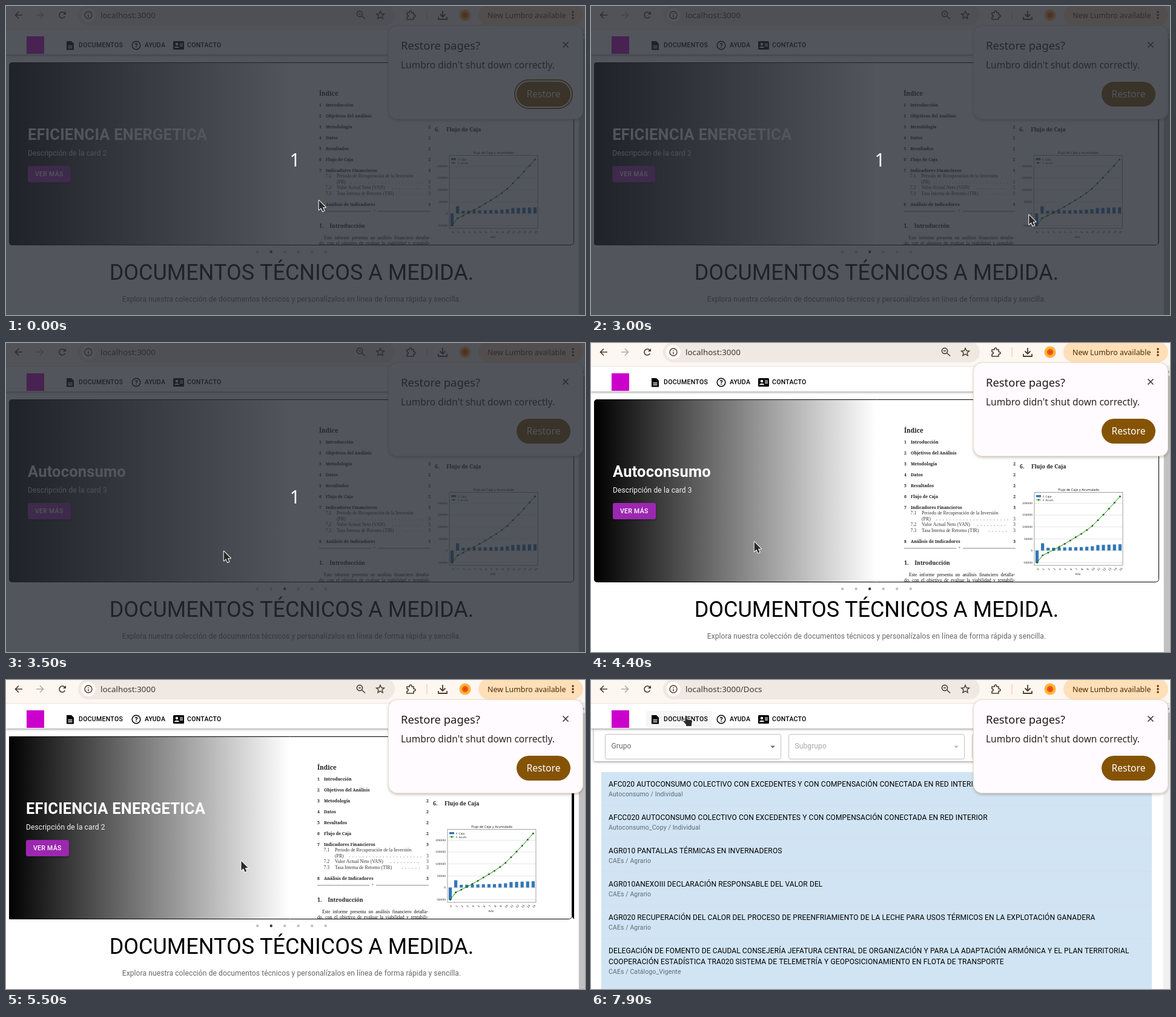
Write an HTML page with a canvas that moves like this. It is 956 by 510 pixels and loops after 8000 ms.

```html
<!DOCTYPE html>
<html lang="es">
<head>
<meta charset="utf-8">
<title>Documentos técnicos</title>
<style>
html, body { margin: 0; width: 100%; height: 100%; overflow: hidden; background: #fff; }
canvas { display: block; width: 956px; height: 510px; }
</style>
</head>
<body>
<canvas id="stage" width="956" height="510"></canvas>
<script>
const c = document.getElementById('stage').getContext('2d');
const LOOP = 8000, PITCH = 933;
const UI = '"Noto Sans", "Open Sans", sans-serif';
const WEB = 'Roboto, sans-serif';
const SERIF = '"Liberation Serif", serif';
const HEAVY = '"Noto Serif", serif';
const ARIAL = '"Liberation Sans", sans-serif';
const PLOT = '"DejaVu Sans", sans-serif';
const INK = '#4b3b2a', PURPLE = '#9c27b0';

// times of the hard changes
const T = { ring: 100, next: 3000, fade: 3850, grab: 4750, drop: 5049, busy: 6500, reload: 6600, hover: 7300, docs: 7500 };

// cursor path: time, x, y
const PATH = [
  [0, 516, 320], [100, 500, 324], [200, 455, 334], [300, 424, 338], [400, 490, 339], [500, 600, 338],
  [600, 700, 337], [700, 740, 336], [850, 740, 336], [1000, 731, 339], [1100, 724, 342], [1600, 724, 342],
  [1700, 723, 344], [3000, 723, 344], [3200, 610, 350], [3500, 359, 343], [3700, 325, 338], [3820, 325, 338],
  [4700, 240, 322], [4750, 240, 322], [5049, 594, 323], [5100, 600, 323], [5250, 540, 316], [5500, 388, 298],
  [5600, 352, 281], [6000, 200, 150], [6400, 66, 65], [6500, 63, 62], [6700, 63, 62], [6900, 130, 67],
  [7000, 172, 66], [7100, 166, 62], [7300, 159, 60], [7500, 157, 59], [8000, 157, 59]
];

function text(s, x, y, size, family, color = '#000', o = {}) {
  c.font = `${o.w || 400} ${size}px ${family}`;
  c.letterSpacing = (o.ls || 0) * size + 'px';
  c.textAlign = o.align || 'left';
  c.fillStyle = color;
  c.fillText(s, x, y);
}

function justify(s, x, y, width, size, family) {
  c.font = `400 ${size}px ${family}`;
  c.letterSpacing = '0px';
  c.wordSpacing = (width - c.measureText(s).width) / (s.split(' ').length - 1) + 'px';
  text(s, x, y, size, family, '#111');
  c.wordSpacing = '0px';
}

function rect(x, y, w, h, color) {
  c.fillStyle = color;
  c.fillRect(x, y, w, h);
}

function round(x, y, w, h, r, fill, stroke, lw = 1) {
  c.beginPath();
  c.roundRect(x, y, w, h, r);
  if (fill) { c.fillStyle = fill; c.fill(); }
  if (stroke) { c.strokeStyle = stroke; c.lineWidth = lw; c.stroke(); }
}

function disc(x, y, r, fill) {
  c.beginPath();
  c.arc(x, y, r, 0, 7);
  c.fillStyle = fill;
  c.fill();
}

function ring(x, y, r, color, lw, a = 0, b = 7) {
  c.beginPath();
  c.arc(x, y, r, a, b);
  c.strokeStyle = color;
  c.lineWidth = lw;
  c.stroke();
}

function shape(d, x, y, stroke, lw, fill) {
  const p = new Path2D(d);
  c.save();
  c.translate(x, y);
  if (stroke) { c.strokeStyle = stroke; c.lineWidth = lw; c.stroke(p); }
  if (fill) { c.fillStyle = fill; c.fill(p); }
  c.restore();
}

function shadow(color, blur, dy) {
  c.shadowColor = color;
  c.shadowBlur = blur;
  c.shadowOffsetY = dy;
}
const noShadow = () => shadow('transparent', 0, 0);

// the CSS "ease" curve
function ease(x) {
  if (x <= 0) return 0;
  if (x >= 1) return 1;
  let lo = 0, hi = 1, s = .5;
  for (let i = 0; i < 20; i++) {
    s = (lo + hi) / 2;
    const u = 1 - s;
    if (.75 * u * u * s + .75 * u * s * s + s * s * s < x) lo = s; else hi = s;
  }
  const u = 1 - s;
  return .3 * u * u * s + 3 * u * s * s + s * s * s;
}

function cursorAt(t) {
  const i = Math.max(1, PATH.findIndex(p => p[0] > t));
  const [t0, x0, y0] = PATH[i - 1], [t1, x1, y1] = PATH[i];
  const k = (t - t0) / (t1 - t0);
  return [x0 + (x1 - x0) * k, y0 + (y1 - y0) * k];
}

function slideAt(t) {
  if (t >= T.reload) return 0;
  if (t < T.grab) return 1 + ease((t - T.next) / 500);
  const held = 2 - (cursorAt(Math.min(t, T.drop))[0] - 240) / PITCH;
  return held + (1 - held) * ease((t - T.drop) / 500);
}

const dotAt = t => t < T.next ? 1 : t < T.drop ? 2 : t < T.reload ? 1 : 0;

function toolbar(t) {
  rect(0, 0, 956, 39, '#fdf7f2');
  round(119, -2, 523, 34, 17, '#f0e8e2');
  shape('M6 0H-5M0-5.5L-5.5 0L0 5.5', 21, 15, INK, 1.7);
  shape('M-6 0H5M0-5.5L5.5 0L0 5.5', 56, 15, '#b3aaa2', 1.7);
  if (t >= T.busy && t < T.reload) shape('M-5-5L5 5M5-5L-5 5', 93, 15, INK, 1.7);
  else {
    ring(93, 15, 5, INK, 1.7, .5, 5.6);
    shape('M6-6V-1H1Z', 93, 15, null, 0, INK);
  }
  disc(136, 15, 12, '#fffaf6');
  ring(136, 15, 6, INK, 1.4);
  shape('M0-3V-1.5M0 0V3.5', 136, 15, INK, 1.5);
  text(t >= T.docs ? 'localhost:3000/Docs' : 'localhost:3000', 156, 20, 13.4, UI, '#41372d');
  ring(584, 13, 4.6, INK, 1.6);
  shape('M3.5 3.5L9 8.5M-2 0H2', 584, 13, INK, 1.6);
  shape('M0-6.5L1.9-2.2L6.5-1.8L3 1.2L4.1 5.8L0 3.4L-4.1 5.8L-3 1.2L-6.5-1.8L-1.9-2.2Z', 618, 15, INK, 1.4);
  shape('M-6-4H-2C-2-8 2-8 2-4H5V-.5C9-.5 9 3.5 5 3.5V7H-6V3.5C-3 3.5-3-.5-6-.5Z', 668, 15, INK, 1.6);
  rect(694, 7, 2, 16, '#fbd9b3');
  shape('M0-7V3M-4.5-1.5L0 3L4.5-1.5M-7 3V7H7V3', 721, 15, INK, 1.8);
  const g = c.createRadialGradient(758, 15, 1, 758, 15, 9.5);
  g.addColorStop(0, '#e8401c');
  g.addColorStop(.45, '#f4671c');
  g.addColorStop(.6, '#ffc31f');
  g.addColorStop(1, '#ffa64a');
  disc(758, 15, 9.5, g);
  round(780, -2, 173, 34, 17, '#ffdfb8');
  text('New Lumbro available', 795, 20, 12.4, UI, '#4a2d05');
  for (const y of [10, 15, 20]) disc(936, y, 1.7, '#4a2d05');
  rect(0, 38, 956, 1, '#ece3dc');
}

function header(t) {
  shadow('rgba(0,0,0,.45)', 4, 1);
  rect(0, 39, 945, 41, '#fff');
  noShadow();
  rect(0, 39, 945, 3, '#fff');
  if (t >= T.hover) round(91, 51, 109, 27, 3, '#f6f6f6');
  rect(34, 50, 29, 29, '#cc00cc');
  shape('M-6-7H2L6-3V7.5H-6Z', 106, 65, null, 0, '#000');
  shape('M-3.5 1H3.5M-3.5 4H3.5', 106, 65, '#fff', 1.3);
  ring(215, 65, 6.8, '#000', 1.5);
  text('?', 215, 69, 10.5, WEB, '#000', { w: 700, align: 'center' });
  round(276, 58, 18, 14, 1.5, '#000');
  disc(282, 63, 2.2, '#fff');
  shape('M-4 4C-4 1 4 1 4 4ZM5-3H10V-1.6H5ZM5 0H10V1.4H5Z', 282, 65, null, 0, '#fff');
  const nav = { w: 500, ls: .02857 };
  text('DOCUMENTOS', 120, 68, 10.5, WEB, '#000', nav);
  text('AYUDA', 229, 68, 10.5, WEB, '#000', nav);
  text('CONTACTO', 299, 68, 10.5, WEB, '#000', nav);
}

function scrollbar(top, height) {
  rect(945, 39, 11, 471, '#f0f0f0');
  shape('M-2 1.5L0-1.5L2 1.5Z', 953, 47, null, 0, '#777');
  rect(946, top, 10, height, '#c1c1c1');
}

function chart() {
  const zero = 342.5, step = 9.13, x0 = 736.5;
  const flow = [-20, 12, 4.5, 4.6, 4.9, 5.1, 5.3, 5.5, 5.7, 6.2, 7, 9.1, 9.4, 9.7, 10, 10.3];
  text('Flujo de Caja y Acumulado', 805, 244, 5.1, PLOT, '#111', { align: 'center' });
  for (let k = -1; k < 5; k++) {
    const y = zero - k * 19.6;
    rect(732, y, 146, .6, '#d4d4d4');
    text(String(k * 50000), 729, y + 1.7, 4.4, PLOT, '#222', { align: 'right' });
  }
  c.strokeStyle = '#777';
  c.lineWidth = .7;
  c.strokeRect(732, 246.5, 146, 120.5);
  flow.forEach((v, i) => rect(x0 + i * step - 2.6, zero - Math.max(v, 0), 5.2, Math.abs(v), '#3377b8'));
  let sum = 0;
  const pts = flow.map((v, i) => [x0 + i * step, zero - (sum += v)]);
  c.beginPath();
  pts.forEach(p => c.lineTo(...p));
  c.strokeStyle = '#2c8a1c';
  c.lineWidth = 1;
  c.stroke();
  pts.forEach(([x, y], i) => {
    disc(x, y, 1.5, '#187010');
    c.save();
    c.translate(x + 1, 373);
    c.rotate(-.8);
    text(String(i), 0, 2, 4.4, PLOT, '#222', { align: 'center' });
    c.restore();
  });
  rect(735, 251, 8, 3.5, '#3377b8');
  text('F. Caja', 746, 254.5, 4.4, PLOT, '#222');
  rect(735, 258.5, 8, .8, '#2c8a1c');
  disc(739, 259, 1.4, '#187010');
  text('F. Acum.', 746, 260.5, 4.4, PLOT, '#222');
  text('Año', 804, 383, 4.6, PLOT, '#222', { align: 'center' });
}

function report() {
  const bold = { w: 700 }, dark = '#1c1c1c';
  const head = (n, s, x, y, dx) => {
    text(n, x, y, 8.8, HEAVY, dark, bold);
    text(s, x + dx, y, 8.8, HEAVY, dark, bold);
  };
  text('Índice', 517, 148, 10, HEAVY, dark, { w: 600 });
  const items = ['Introducción', 'Objetivos del Análisis', 'Metodología', 'Datos', 'Resultados', 'Flujo de Caja',
    'Indicadores Financieros', 'Análisis de Indicadores'];
  items.forEach((s, i) => {
    const y = i < 7 ? 166 + i * 17.95 : 329.5;
    text(String(i + 1), 517, y, 6.9, HEAVY, dark, bold);
    text(s, 528, y, 6.9, HEAVY, dark, bold);
    text(i < 6 ? '2' : '3', 701, y, 6.9, HEAVY, dark, { w: 700, align: 'right' });
  });
  const subs = [['7.1', 'Periodo de Recuperación de la Inversión', 283], ['', '(PR)', 292.5, 570],
    ['7.2', 'Valor Actual Neto (VAN)', 302, 638], ['7.3', 'Tasa Interna de Retorno (TIR)', 311.5, 657]];
  for (const [n, s, y, lead] of subs) {
    text(n, 527.5, y, 7.8, SERIF, '#333');
    text(s, 546, y, 7.8, SERIF, '#333');
    if (!lead) continue;
    for (let x = lead; x < 688; x += 5.6) rect(x, y - 1, 1, 1, '#666');
    text('3', 701, y, 7.8, SERIF, '#333', { align: 'right' });
  }
  rect(517, 338.5, 86, .8, '#666');
  rect(614, 338.5, 87, .8, '#666');
  text('+', 608.5, 340, 7, SERIF, '#333', { align: 'center' });
  head('1.', 'Introducción', 517, 366, 17.5);
  justify('Este informe presenta un análisis financiero detalla-', 525, 385, 175, 7.8, SERIF);
  justify('do, con el objetivo de evaluar la viabilidad y rentabili-', 517, 394, 183, 7.8, SERIF);

  head('5.', 'Resultados', 708, 146, 19);
  c.strokeStyle = '#444';
  c.lineWidth = 1;
  c.strokeRect(717, 158.5, 167, 27);
  [['Periodo de recuperación [años]', '3'], ['Valor Actual Neto [€]', '125279.4'], ['Tasa Interna de Retorno [%]', '35.77']]
    .forEach(([a, b], i) => {
      text(a, 722, 165 + i * 9.2, 7.8, SERIF, dark);
      text(b, 851, 165 + i * 9.2, 7.8, SERIF, dark);
    });
  head('6.', 'Flujo de Caja', 708, 206.5, 19);
  chart();
}

function sheet() {
  rect(538, 149, 338, 57, '#e4e4e4');
  c.strokeStyle = '#555';
  c.lineWidth = 1;
  for (const [y, h] of [[149.5, 57], [206.5, 18], [224.5, 18], [242.5, 18]]) {
    c.strokeRect(538.5, y, 73, h);
    c.strokeRect(611.5, y, 264, h);
  }
  text('Ficha', 543, 179, 9.3, ARIAL, '#111');
  ['RES090: Hibridación de caldera de', 'combustión con bomba de calor', 'eléctrica en vivienda de zona', 'climática A3 o A4']
    .forEach((s, i) => text(s, 616, 161 + i * 13, 9.3, ARIAL, '#111', { w: 700 }));
  [['Código', 'RES090'], ['Versión', 'V1.0'], ['Sector', 'Residencial']].forEach(([a, b], i) => {
    text(a, 543, 218.5 + i * 18, 7.6, ARIAL, '#111');
    text(b, 616, 219 + i * 18, 9.3, ARIAL, '#111');
  });
  text('1.', 652, 285, 9.3, ARIAL, '#111');
  text('ÁMBITO DE APLICACIÓN', 666, 285, 9.3, ARIAL, '#111');
  const line = (s, y) => justify(s, 538, y, 338, 9.3, ARIAL);
  line('Hibridación en modo paralelo de caldera/s de combustión existente/s en un edificio', 311);
  line('de uso residencial privado¹, ubicado en zona climática A3 o A4, con bomba de', 327);
  line('calor de accionamiento eléctrico tipo aire-aire, aire-agua o agua-agua o', 343);
  text('combinadas, para la calefacción y/o, agua caliente sanitaria (ACS).', 538, 359, 9.3, ARIAL, '#111');
  line('En esta ficha no es aplicable las bombas de calor cuyo compresor esté accionado', 378);
  text('térmicamente.', 538, 394, 9.3, ARIAL, '#111');
}

const CARDS = [
  { title: ['Certificados de Ahorro Energético', '(CAE)'], page: sheet,
    body: ['CÁLCULO DEL AHORRO DE ENERGÍA mediante fichas de medidas', 'estandarizadas.'] },
  { title: ['EFICIENCIA ENERGETICA'], body: ['Descripción de la card 2'], page: report },
  { title: ['Autoconsumo'], body: ['Descripción de la card 3'], page: report }
];

function card({ title, body, page }, dx) {
  c.save();
  c.translate(dx, 0);
  c.beginPath();
  c.roundRect(5, 93, PITCH, 302, 5);
  c.clip();
  rect(5, 93, PITCH, 302, '#fff');
  page();
  const g = c.createLinearGradient(5, 0, 471, 0);
  g.addColorStop(0, '#000');
  g.addColorStop(1, 'rgba(0,0,0,0)');
  rect(5, 93, 466, 302, g);
  let y = title.length > 1 ? 196 : 221;
  for (const s of title) {
    text(s, 36, y, 25.5, WEB, '#fff', { w: 700, ls: .00735 });
    y += 31;
  }
  y -= 5;
  for (const s of body) {
    text(s, 36, y, 12, WEB, '#f2f2f2', { ls: .00938 });
    y += 18;
  }
  const top = y - 1;
  shadow('rgba(0,0,0,.35)', 3, 1.5);
  round(36, top, 71, 27, 3, PURPLE);
  noShadow();
  text('VER MÁS', 48, top + 17, 10.5, WEB, '#fff', { w: 500, ls: .02857 });
  round(5.5, 93.5, PITCH - 1, 301, 5, null, '#000');
  c.restore();
}

function home(t) {
  rect(0, 39, 956, 471, '#fff');
  c.save();
  c.beginPath();
  c.rect(5, 93, PITCH, 302);
  c.clip();
  const pos = slideAt(t);
  CARDS.forEach((k, i) => {
    if (Math.abs(i - pos) < 1) card(k, (i - pos) * PITCH);
  });
  c.restore();
  const active = dotAt(t);
  for (let i = 0; i < 6; i++) disc(415.2 + i * 22.5, 405.8, 2.2, i === active ? '#3c3c3c' : '#bfbfbf');
  text('DOCUMENTOS TÉCNICOS A MEDIDA.', 471.5, 452, 36, WEB, '#000', { align: 'center' });
  text('Explora nuestra colección de documentos técnicos y personalízalos en línea de forma rápida y sencilla.',
    471.5, 488, 12, WEB, '#666', { align: 'center', ls: .00938 });
  header(t);
  scrollbar(54, 456);
}

const ROWS = [
  ['Autoconsumo / Individual', 'AFC020 AUTOCONSUMO COLECTIVO CON EXCEDENTES Y CON COMPENSACIÓN CONECTADA EN RED INTERIOR'],
  ['Autoconsumo_Copy / Individual', 'AFCC020 AUTOCONSUMO COLECTIVO CON EXCEDENTES Y CON COMPENSACIÓN CONECTADA EN RED INTERIOR'],
  ['CAEs / Agrario', 'AGR010 PANTALLAS TÉRMICAS EN INVERNADEROS'],
  ['CAEs / Agrario', 'AGR010ANEXOIII DECLARACIÓN RESPONSABLE DEL VALOR DEL'],
  ['CAEs / Agrario', 'AGR020 RECUPERACIÓN DEL CALOR DEL PROCESO DE PREENFRIAMIENTO DE LA LECHE PARA USOS TÉRMICOS EN LA EXPLOTACIÓN GANADERA'],
  ['CAEs / Catálogo_Vigente',
    'DELEGACIÓN DE FOMENTO DE CAUDAL CONSEJERÍA JEFATURA CENTRAL DE ORGANIZACIÓN Y PARA LA ADAPTACIÓN ARMÓNICA Y EL PLAN TERRITORIAL',
    'COOPERACIÓN ESTADÍSTICA TRA020 SISTEMA DE TELEMETRÍA Y GEOPOSICIONAMIENTO EN FLOTA DE TRANSPORTE']
];

function docs(t) {
  rect(0, 39, 956, 471, '#fff');
  shadow('rgba(0,0,0,.45)', 4, 1);
  rect(5, 80, 939, 54, '#fff');
  noShadow();
  [['Grupo', '#666'], ['Subgrupo', '#a8a8a8'], ['', '#a8a8a8']].forEach(([s, color], i) => {
    const x = 23.5 + i * 303;
    round(x, 89.5, 290, 41, 3, '#fff', '#c0c0c0');
    text(s, x + 10, 113, 12, WEB, color, { ls: .00938 });
    shape('M-4-2H4L0 2Z', x + 276.5, 110.5, null, 0, i ? '#bdbdbd' : '#757575');
  });
  rect(17, 152, 909, 358, '#d0e4f4');
  ROWS.forEach(([sub, ...lines], i) => {
    let y = 176 + i * 55;
    if (i) rect(17, 151 + i * 55, 909, 1, '#d4dfe6');
    for (const s of lines) {
      text(s, 29, y, 12, WEB, '#000', { ls: .00938 });
      y += 18;
    }
    text(sub, 29, y - 2, 10.5, WEB, '#5f6a72', { ls: .01071 });
  });
  header(t);
  scrollbar(54, 45);
}

function popup(t) {
  shadow('rgba(60,40,10,.35)', 5, 1.5);
  round(632, 33, 321, 154, 14, '#fffbff');
  noShadow();
  round(631.5, 32.5, 321, 154, 14, null, '#ecdfd0');
  text('Restore pages?', 652, 72, 18.4, UI, '#201a14', { w: 500 });
  text("Lumbro didn't shut down correctly.", 652, 103, 15.5, UI, '#2c251e');
  shape('M-4.5-4.5L4.5 4.5M4.5-4.5L-4.5 4.5', 924, 64, '#3d342b', 1.6);
  if (t < T.ring) round(840, 122, 95, 47, 23.5, null, '#855304', 2);
  round(843, 125, 89, 41, 20.5, '#855304');
  text('Restore', 887.5, 151, 15.6, UI, '#fff', { w: 500, align: 'center' });
}

function countdown(t) {
  const a = Math.max(0, Math.min(1, 1 - (t - T.fade) / 300));
  if (!a) return;
  c.globalAlpha = a;
  rect(0, 0, 956, 510, 'rgba(39,43,50,.8)');
  text('1', 477, 265, 30, UI, '#fff', { align: 'center' });
  c.globalAlpha = 1;
}

const ARROW = 'M.8.8V16.5L4.4 13.2L7 19L9.6 17.8L7.1 12.2H12Z';
const HAND = 'M-1.5 1C-1.5-.5 1.5-.5 1.5 1V6L8 7C9.5 7.3 10 8 10 9.5L9 14V17H0V14.5L-4.5 9.5C-5 8-3.5 7.5-2.5 8.5L-1.5 9.5Z';

function cursor(t) {
  const [x, y] = cursorAt(t);
  const link = y > 49 && y < 79 && (x > 17 && x < 79 || x > 91 && x < 200);
  c.lineJoin = 'round';
  shape(link ? HAND : ARROW, x, y, '#fff', 2, '#2b2b2b');
  c.lineJoin = 'miter';
}

function draw(t) {
  (t >= T.docs ? docs : home)(t);
  toolbar(t);
  popup(t);
  countdown(t);
  cursor(t);
}

const start = performance.now();
function tick() {
  draw((performance.now() - start) % LOOP);
  requestAnimationFrame(tick);
}
tick();
</script>
</body>
</html>
```
